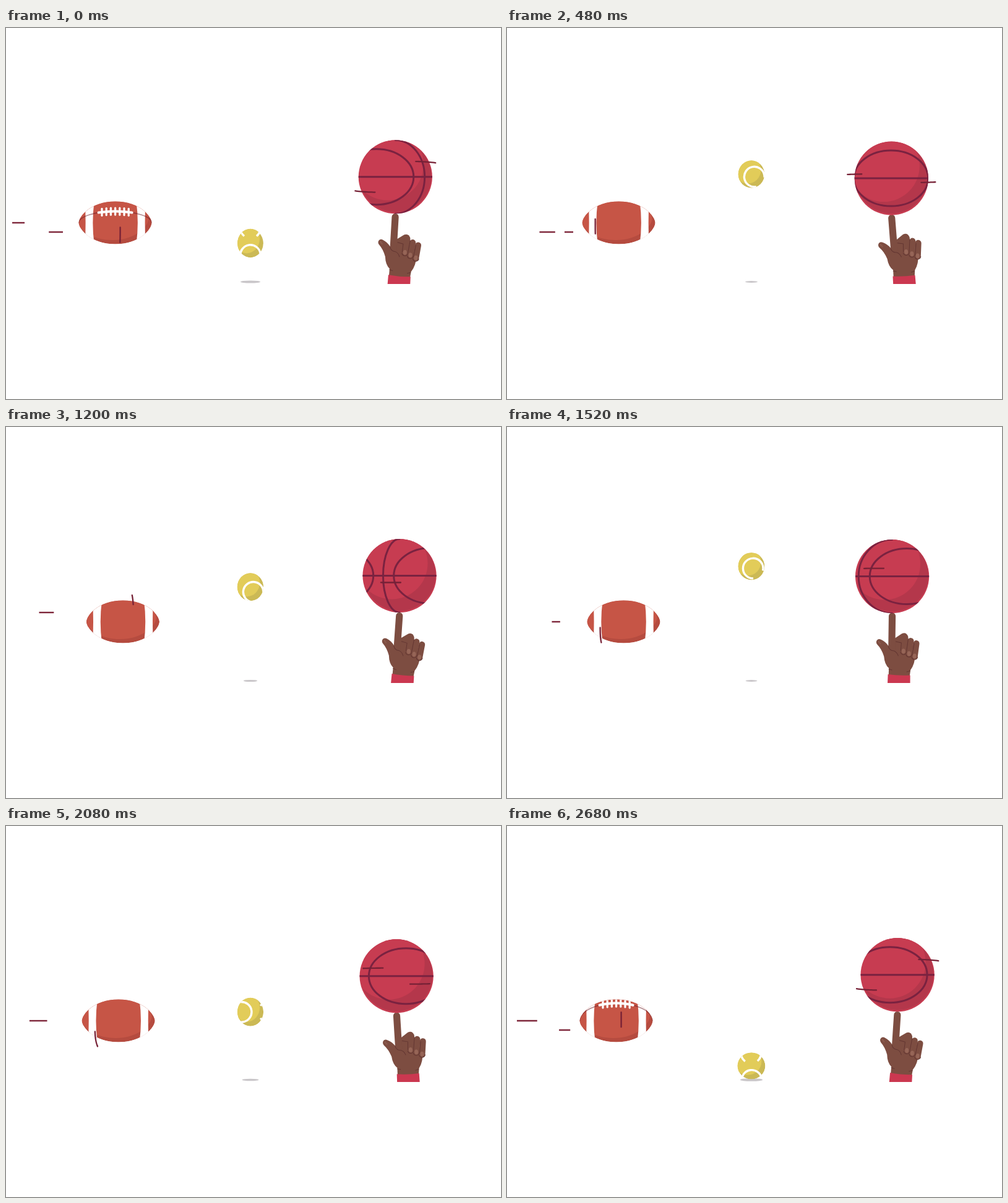
Recreate the animation shown at these times as an HTML page with a canvas. Size 800 by 600 pixels, loop 2.72 s.

```html
<!DOCTYPE html>
<html lang="en">
<head>
<meta charset="utf-8">
<title>Sports balls</title>
<style>
  html, body { margin: 0; width: 100%; height: 100%; overflow: hidden; background: #fff; }
  canvas { display: block; width: 800px; height: 600px; }
</style>
</head>
<body>
<canvas id="stage" width="800" height="600"></canvas>
<script>
const g = document.getElementById('stage').getContext('2d');
const LOOP = 2720, STEP = 40, SPIN = LOOP / 10, BOUNCE = LOOP / 4;
const TAU = Math.PI * 2;
const LINE = '#762136';

const mod = (v, n) => ((v % n) + n) % n;
const clamp = (v, lo, hi) => Math.min(hi, Math.max(lo, v));

function ellipse(x, y, rx, ry) {
  g.beginPath();
  g.ellipse(x, y, rx, ry, 0, 0, TAU);
}

function fill(color) { g.fillStyle = color; g.fill(); }

function stroke(color, width) {
  g.strokeStyle = color;
  g.lineWidth = width;
  g.stroke();
}

function polyline(points, color, width) {
  g.beginPath();
  points.forEach(p => g.lineTo(p[0], p[1]));
  stroke(color, width);
}

function layer(x, y, draw) {
  g.save();
  g.translate(x, y);
  draw();
  g.restore();
}

// A speed line along a ball's surface, bending inwards near the rim.
function streak(lane, center, length, reach, place) {
  const a = clamp(center - length / 2, -reach, reach);
  const b = clamp(center + length / 2, -reach, reach);
  const points = [];
  for (let i = 0; i <= 12; i++) {
    const s = a + (b - a) * i / 12;
    points.push(place(lane * (1 - 0.13 * (s / reach) ** 4), s));
  }
  polyline(points, LINE, 2.3);
}

// Each spin flashes one [lane, center] after another; returns the current one, drifting.
function flash(marks, t, speed) {
  const u = mod(t + 47, SPIN) / SPIN * marks.length;
  const [lane, center] = marks[Math.floor(u)];
  return [lane, center + speed * (u % 1 - 0.5) * SPIN / marks.length];
}

const WIND = [
  { y: 300, from: 90, to: 3, starts: [250, 1131, 2340] },
  { y: 315, from: 90, to: 10, starts: [657, 1484, 1973, 2528] },
  { y: 330, from: 113, to: 52, starts: [317, 426, 696, 862, 2602] }
];

function drawWind(t) {
  g.lineCap = 'butt';
  for (const { y, from, to, starts } of WIND) {
    for (const start of starts) {
      const u = mod(t - start, LOOP) / 230;
      if (u >= 1) continue;
      const x = v => from + (to - from) * v;
      polyline([[x(u ** 1.6), y], [x(Math.min(1, u * 1.4)), y]], '#7d2539', 2.4);
    }
  }
  g.lineCap = 'round';
}

const FOOTBALL_MARKS = [[8, 6], [8, 30], [8, -18], [17, -40], [-38, 20], [-38, 3]];

// Built from one quarter, mirrored by flipping the canvas axes.
function footballPath(dx, dy) {
  const quarter = new Path2D('M0 0V-34.5C-40 -34.5 -59 -10 -59 0Z');
  const path = new Path2D();
  for (const sx of [-1, 1])
    for (const sy of [-1, 1])
      path.addPath(quarter, new DOMMatrix([sx, 0, 0, sy, dx, dy]));
  return path;
}

const FOOTBALL = new Path2D('M-59 0C-59 -10 -40 -34.5 0 -34.5S59 -10 59 0S40 34.5 0 34.5S-59 10 -59 0Z');

function stripe(side) {
  g.beginPath();
  g.moveTo(side * 48.5, -34);
  g.lineTo(side * 34, -34);
  g.quadraticCurveTo(side * 38.5, 0, side * 34, 34);
  g.lineTo(side * 48.5, 34);
  g.quadraticCurveTo(side * 47.5, 0, side * 48.5, -34);
  fill('#fff');
}

function drawLaces(t) {
  const age = mod(t - 216, SPIN) - 4;
  const h = -29 + 0.0039 * age * age;
  if (h > 34.5) return;
  const arc = x => h * Math.sqrt(1 - (x / 59) ** 2);
  g.beginPath();
  g.ellipse(0, 0, 59, Math.abs(h), 0, h < 0 ? Math.PI : 0, h < 0 ? TAU : Math.PI);
  stroke('rgba(105,25,35,.5)', 1.7);
  const seam = [];
  for (let x = -27; x <= 27; x += 3) seam.push([x, arc(x)]);
  polyline(seam, '#fff', 4);
  for (let i = -3; i <= 3; i++) {
    const x = i * 7.2, y = arc(x);
    polyline([[x, y - 5.5], [x, y + 5.5]], '#fff', 3.2);
  }
}

function drawFootball(t) {
  const p = TAU * t / LOOP;
  layer(182.9 - 6.3 * Math.cos(p) + 0.6 * Math.sin(p), 315, () => {
    g.save();
    g.clip(FOOTBALL);
    g.fillStyle = '#b54b3f';
    g.fill(FOOTBALL);
    layer(-5, -6.5, () => {
      g.fillStyle = '#c65546';
      g.fill(FOOTBALL);
    });
    stripe(-1);
    stripe(1);
    drawLaces(t);
    g.restore();
    const [lane, center] = flash(FOOTBALL_MARKS, t, 0.5);
    streak(lane, center, 24, 43, (across, along) => [across, along]);
  });
}

function drawTennis(t) {
  const apex = 305, half = BOUNCE / 2;
  const d = mod(t - apex + half, BOUNCE) - half;
  const y = Math.min(388, 210.5 + 4.85e-6 * Math.abs(d) ** 3);
  const ground = clamp((y - 355) / 30, 0, 1);
  const stretch = 1.45e-5 * d * d * (1 - ground);
  const rx = 21.5 - 0.4 * stretch + 0.9 * ground;
  const ry = 21.8 + 1.1 * stretch - 0.2 * ground;

  const shadow = 9 + (y - 217) * 0.0535;
  ellipse(395, 410.5, shadow, 0.5 + shadow * 0.1);
  fill('#c9c6c9');

  // Two seam rings roll twice per bounce, sliding to the middle in mid-air.
  const u = mod(t, BOUNCE) / BOUNCE;
  const roll = Math.PI / 2 + 2 * TAU * (1 - (1 - u) ** 2.2);
  const slide = 19 * (d / apex) ** 2;
  layer(395, y, () => {
    ellipse(0, 0, rx, ry);
    g.clip();
    fill('#cbb955');
    ellipse(-6, -7, rx, ry);
    fill('#e2cc59');
    g.rotate(roll);
    g.lineCap = 'butt';
    for (const x of [slide, slide - 43.5]) {
      g.beginPath();
      g.arc(x, 0, 16.3, 0.66, TAU - 0.66);
      stroke('#fff', 3.4);
    }
  });
}

const BALL_MARKS = [[-25, 42], [-25, 38], [18, 55], [11, -14], [-13, -28], [7, 67]];

function drawBasketball(x, y, t) {
  const R = 59.6, GAP = 153, SEAM = '#7a2240';
  const q = mod(t, SPIN) / SPIN;
  const slide = -30.5 - GAP * (q + 0.06 * Math.sin(Math.PI * q));
  layer(x, y, () => {
    g.save();
    ellipse(0, 0, R, R);
    fill('#c73c51');
    g.clip();
    g.save();
    ellipse(0, -1.2, 58.4, 58.4);
    g.clip();
    fill('#b4374b');
    ellipse(-12.5, -20, 58, 58);
    fill('#c73c51');
    g.restore();
    for (let k = -1; k <= 2; k++) {
      const c = slide + GAP * k, m = (c + GAP / 2) * 1.03;
      ellipse(c, 0, 60, 45);
      stroke(SEAM, 3);
      if (Math.abs(m) < R) {
        g.beginPath();
        g.ellipse(0, 0, Math.abs(m), R, 0, -Math.PI / 2, Math.PI / 2, m < 0);
        stroke(SEAM, 3);
      }
    }
    polyline([[-R, 0], [R, 0]], SEAM, 3);
    g.restore();

    // Marks near the rim get a twin on the opposite side.
    const [lane, center] = flash(BALL_MARKS, t, -0.52);
    for (const side of Math.abs(center) > 32 ? [1, -1] : [1])
      streak(side * lane, side * center, 32, 71, (across, along) => [along, across]);
  });
}

const SKIN = '#7d4d41', CREASE = '#633632', NAIL = '#966557';
const PALM = new Path2D('M616 354L629 346L660 366Q659 384 652 393L650.5 404H616.5L617 390' +
  'Q610 384 609 371Q605 359 598 352C594 347 599 341 604 344Q611 347 616 354Z');
const KNUCKLE = new Path2D('M626 342L638 334Q645 331 648 339L645 364H628Z');
const CREASES = new Path2D('M648 343L645.3 363M657.6 350L654.5 369M628 347L637 349L636 362' +
  'M616 355Q618 362 625 362Q630 364 632 370M617 391.5L622 393M651 394.5L646 396');
const SLEEVE = new Path2D('M615.5 400Q633 402.5 651.5 401.3V428H614.5Z');

function drawHand(wristX, angle) {
  g.save();
  g.beginPath();
  g.rect(540, 280, 200, 134);
  g.clip();
  g.translate(wristX, 414);
  g.rotate(angle);
  g.translate(-633, -414);

  g.fillStyle = SKIN;
  g.fill(PALM);
  g.fill(KNUCKLE);
  polyline([[622, 306], [621.5, 360]], SKIN, 11.2);
  for (let i = 0; i < 3; i++) {
    const x = 640.5 + 9 * i, y = 363 + 4 * i;
    polyline([[x + 2.7, y - 21], [x, y]], SKIN, 10);
  }
  g.strokeStyle = CREASE;
  g.lineWidth = 1;
  g.stroke(CREASES);
  for (let i = 0; i < 3; i++) {
    const x = 640.5 + 9 * i, y = 363 + 4 * i;
    g.beginPath();
    g.arc(x, y, 5, 0.2, Math.PI - 0.2);
    stroke(CREASE, 1);
    ellipse(x, y - 0.5, 3, 4);
    fill(NAIL);
  }
  polyline([[600, 347], [603, 350.5]], '#8b5a4d', 2.2);
  g.fillStyle = '#cb3850';
  g.fill(SLEEVE);
  g.restore();
}

function drawSpinner(t) {
  const p = TAU * t / (LOOP / 2);
  const x = 629.3 - 10 * Math.sin(p);
  const y = 241.8 - 1.3 * Math.cos(p - TAU * 0.9);
  const wrist = 642 - 9 * Math.cos(p - TAU * 0.1);
  const lean = Math.atan2(x - wrist, 114 - (y - 240.5)) + Math.atan2(11, 113);
  drawHand(wrist, lean);
  drawBasketball(x, y, t);
}

function frame(now) {
  const t = Math.floor((now % LOOP) / STEP) * STEP;
  g.fillStyle = '#fff';
  g.fillRect(0, 0, 800, 600);
  g.lineCap = g.lineJoin = 'round';
  drawWind(t);
  drawFootball(t);
  drawTennis(t);
  drawSpinner(t);
}

const start = performance.now();
function tick() {
  frame(performance.now() - start);
  requestAnimationFrame(tick);
}
tick();
</script>
</body>
</html>
```
